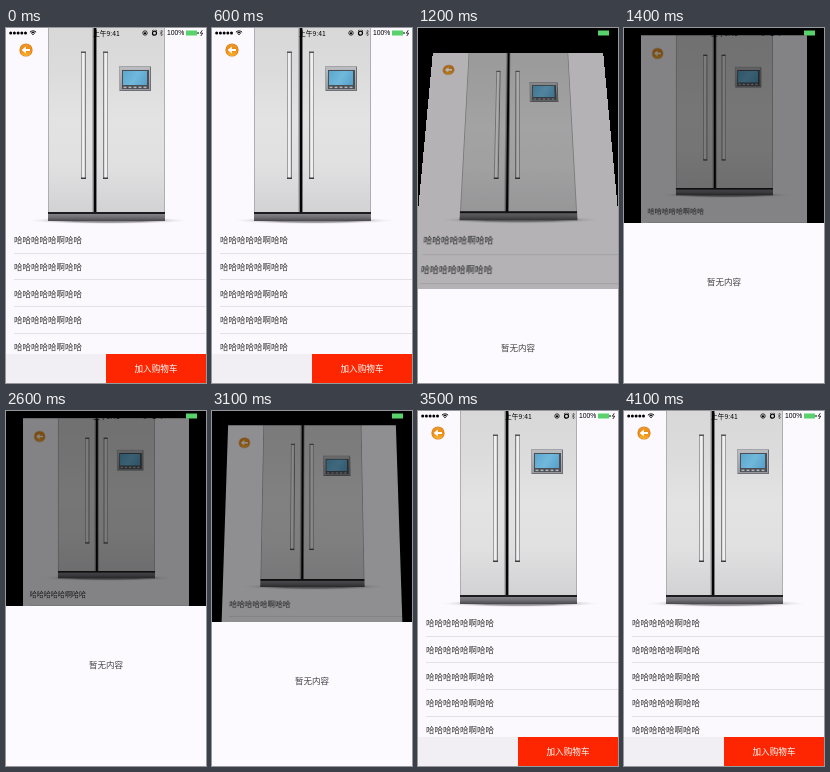
An HTML page with a canvas for the animation above (4300 ms loop, 200 by 355 pixels).

```html
<!DOCTYPE html>
<html lang="zh-CN">
<head>
<meta charset="utf-8">
<style>
  html, body { margin: 0; width: 100%; height: 100%; overflow: hidden; background: #000; }
  body { font-family: "Noto Sans CJK SC", "Noto Sans CJK", sans-serif; }
  #stage { position: relative; width: 200px; height: 355px; overflow: hidden; background: #000; }
  #stage div, canvas { position: absolute; }
  #page { left: 0; top: 0; width: 200px; height: 355px; background: #fbf9fd; overflow: hidden; }
  .row { left: 8px; width: 192px; height: 26.6px; line-height: 24.4px; font-size: 8.5px;
         color: #333; box-sizing: border-box; border-bottom: 1px solid #e3e1e5; white-space: nowrap; }
  #bar { left: 0; top: 326px; width: 200px; height: 29px; background: #f1eff4; }
  #buy { left: 100px; width: 100px; height: 29px; line-height: 28.6px; text-align: center;
         font-size: 8.6px; color: #fff; background: #fe2600; }
  #dim { inset: 0; background: #000; }
  #sheet { left: 0; top: 355px; width: 200px; height: 160px; background: #fcfafe; }
  #empty { top: 48px; width: 200px; line-height: 20px; text-align: center; font-size: 8.5px; color: #444; }
  #status { left: 0; top: 0; width: 200px; height: 10px; color: #000; font-size: 6.8px; line-height: 10px; white-space: nowrap; }
  #status canvas { left: 0; top: 0; }
  #clock { left: 87px; }
  #charge { left: 161px; font-family: "Liberation Sans", Arial, sans-serif; }
</style>
</head>
<body>
<div id="stage">
  <div id="page">
    <canvas id="product" width="200" height="200"></canvas>
    <div id="bar"><div id="buy">加入购物车</div></div>
  </div>
  <div id="dim"></div>
  <div id="sheet"><div id="empty">暂无内容</div></div>
  <div id="status">
    <canvas id="icons" width="200" height="10"></canvas>
    <div id="clock">上午9:41</div>
    <div id="charge">100%</div>
  </div>
</div>
<script>
const $ = id => document.getElementById(id);
const page = $('page'), dim = $('dim'), sheet = $('sheet');

for (let i = 0; i < 5; i++) {
  const row = document.createElement('div');
  row.className = 'row';
  row.textContent = '哈哈哈哈哈啊哈哈';
  row.style.top = 199.3 + i * 26.6 + 'px';
  page.insertBefore(row, $('bar'));
}

function painter(id) {
  const c = $(id).getContext('2d');
  const gradient = (x0, y0, x1, y1, colors) => {
    const g = c.createLinearGradient(x0, y0, x1, y1);
    colors.forEach((color, i) => g.addColorStop(i / (colors.length - 1), color));
    return g;
  };
  const rect = (x, y, w, h, fill) => { c.fillStyle = fill; c.fillRect(x, y, w, h); };
  const disc = (x, y, r, fill) => {
    c.fillStyle = fill;
    c.beginPath();
    c.arc(x, y, r, 0, Math.PI * 2);
    c.fill();
  };
  const line = (points, color, width) => {
    c.strokeStyle = color;
    c.lineWidth = width;
    c.beginPath();
    points.forEach(([x, y]) => c.lineTo(x, y));
    c.stroke();
  };
  const arc = (x, y, r, from, to, color, width) => {
    c.strokeStyle = color;
    c.lineWidth = width;
    c.beginPath();
    c.arc(x, y, r, from, to);
    c.stroke();
  };
  return { c, gradient, rect, disc, line, arc };
}

function drawProduct() {
  const { c, gradient, rect, disc, line } = painter('product');

  // Floor shadow
  c.save();
  c.translate(102, 192.5);
  c.scale(1, 0.045);
  const shadow = c.createRadialGradient(0, 0, 40, 0, 0, 82);
  shadow.addColorStop(0, '#8d8b90');
  shadow.addColorStop(1, 'rgba(251,249,253,0)');
  disc(0, 0, 82, shadow);
  c.restore();

  // Doors, gap and base
  const metal = gradient(0, 0, 0, 184, ['#d8d8d9', '#dcdcdd', '#e3e3e4', '#e0e0e1', '#d2d2d4']);
  rect(42, 0, 117, 184, metal);
  rect(42, 0, 1, 184, '#aeaeb1');
  rect(158, 0, 1, 184, '#aeaeb1');
  rect(86, 0, 1, 184, '#b4b4b7');
  rect(87, 0, 4, 184, '#7c7c7f');
  rect(88, 0, 2, 184, '#050506');
  rect(42, 186, 117, 7, gradient(0, 186, 0, 193, ['#838286', '#6d6c70', '#48474b']));
  rect(42, 184, 117, 2, '#1c1c1e');

  // Handles, lit from the centre
  const shades = ['#77777a', '#fafafa', '#e6e6e7', '#555558'];
  for (const [x, colors] of [[75, shades], [97, [...shades].reverse()]]) {
    rect(x, 24, 5, 127, gradient(x, 0, x + 5, 0, colors));
    rect(x, 23.5, 5, 1.5, '#555558');
    rect(x, 149.5, 5, 1.5, '#3c3c3e');
  }

  // Control panel
  rect(113, 38, 32, 25, '#a3a4a7');
  rect(114, 39, 31, 24, '#6f7074');
  rect(114, 39, 30, 23, gradient(0, 39, 0, 62, ['#bcbdc0', '#97999d']));
  rect(116, 42, 27, 19, '#4a4f55');
  rect(117, 43, 24, 14, gradient(117, 43, 141, 57, ['#5ba6cf', '#72b8dc', '#559fca']));
  for (let i = 0; i < 5; i++) rect(117.5 + i * 5, 58.6, 3, 1.5, '#b4b6ba');

  // Back button
  disc(20, 22, 6.6, '#d2812c');
  disc(20, 22, 5.9, gradient(0, 16, 0, 28, ['#ea9a2c', '#ef8a12', '#fbb52e']));
  line([[24, 22], [18, 22]], '#fff', 2);
  c.fillStyle = '#fff';
  c.beginPath();
  c.moveTo(15.6, 22);
  c.lineTo(19.8, 18.5);
  c.lineTo(19.8, 25.5);
  c.fill();
}

function drawIcons() {
  const { rect, disc, line, arc } = painter('icons');
  const ink = '#000';
  for (let i = 0; i < 5; i++) disc(4.7 + i * 3.7, 5, 1.5, ink);
  for (const r of [1.2, 2.8, 4.4]) arc(27, 7.3, r, -2.35, -0.79, ink, 1);
  arc(139, 5, 2.2, 0, 6.28, ink, 0.8);
  rect(138, 4.4, 2, 1.7, ink);
  arc(148.5, 5.2, 2, 0, 6.28, ink, 1.2);
  line([[146, 3.2], [147.3, 2]], ink, 0.8);
  line([[149.7, 2], [151, 3.2]], ink, 0.8);
  line([[153.8, 3.5], [156.8, 6.4], [155.3, 8], [155.3, 2], [156.8, 3.5], [153.8, 6.4]], ink, 0.4);
  rect(180, 2.5, 11, 5, '#58d26a');
  rect(191.5, 4, 1, 2, ink);
  line([[196.3, 2.2], [194.3, 5.2], [196.7, 5.2], [194.8, 8]], ink, 0.8);
}

const LOOP = 4300, STEP = 100, DURATION = 460;
const TILT = 0.00097, SHRUNK = 0.83, LIFT = -23, SHEET = 160;
const clamp = v => Math.min(1, Math.max(0, v));
const ease = v => { v = clamp(v); return v * v * (3 - 2 * v); };

function render(now) {
  const t = Math.floor((now % LOOP) / STEP) * STEP;
  const opening = t < 2500;
  const progress = clamp((t - (opening ? 944 : 3010)) / DURATION);
  const open = opening ? progress : 1 - progress;

  // The page leans back first, then flattens while shrinking.
  const lean = ease(open * 2), settle = ease(open * 2 - 1);
  const tilt = TILT * (lean - settle);
  const scale = 1 + (SHRUNK - 1) * settle;
  page.style.transform = open === 0 ? 'none'
    : `matrix3d(${scale},0,0,0, 0,${scale},0,${(-tilt).toFixed(7)}, 0,0,1,0, 0,${LIFT * settle},0,1)`;

  const rise = ease(open);
  dim.style.opacity = 0.48 * rise;
  sheet.style.top = 355 - Math.round(SHEET * rise) + 'px';
}

drawProduct();
drawIcons();
const start = performance.now();
function tick() {
  render(performance.now() - start);
  requestAnimationFrame(tick);
}
tick();
</script>
</body>
</html>
```
